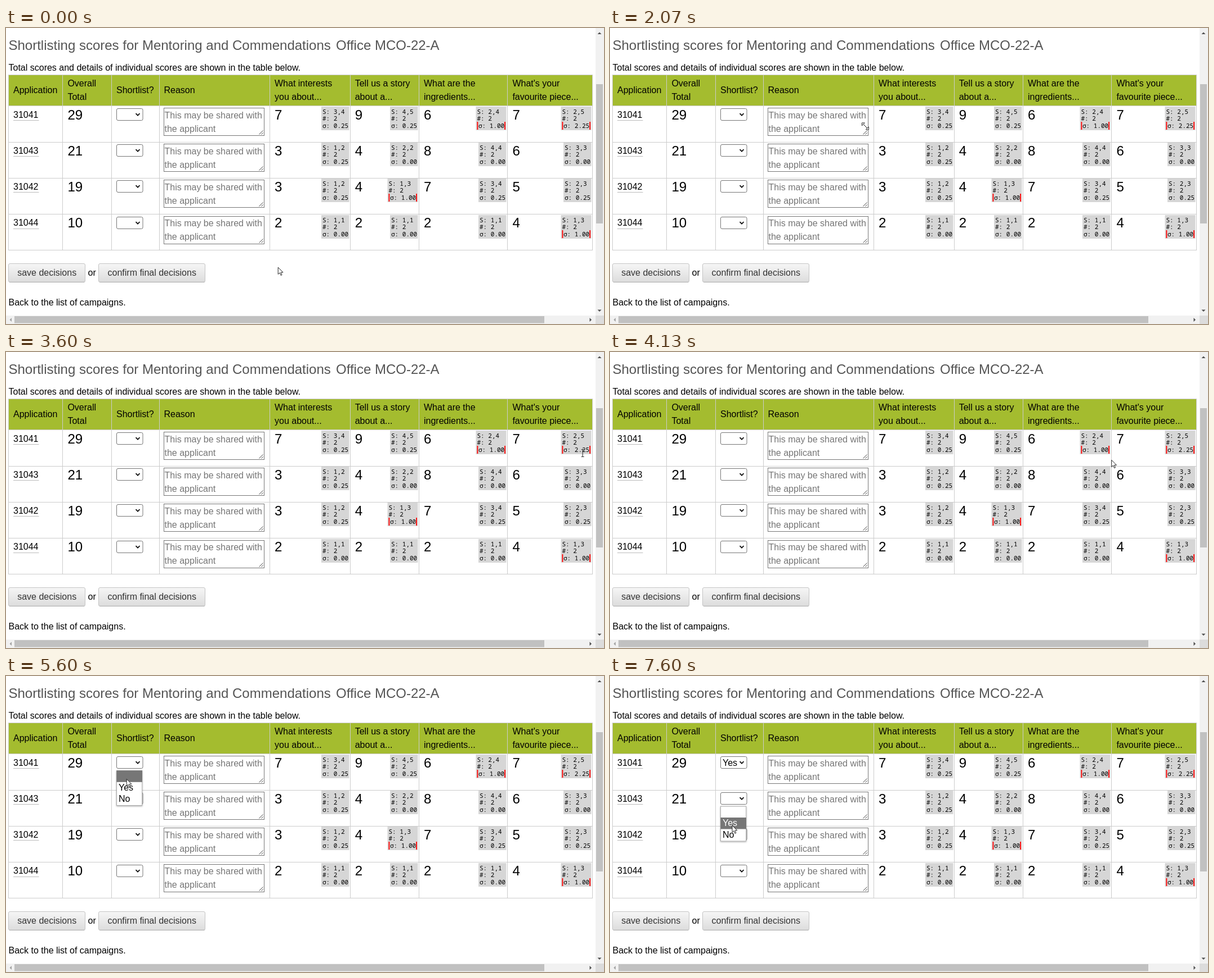
An HTML page that plays this animation: 1062x527 px, repeating every 8 s.

```html
<!DOCTYPE html>
<html lang="en">
<head>
<meta charset="utf-8">
<title>Shortlisting scores</title>
<style>
html, body { margin: 0; width: 100%; height: 100%; overflow: hidden; background: #fff; }
svg { display: block; width: 1062px; height: 527px; }
text { font: 16px "Liberation Sans", Arial, sans-serif; fill: #000; white-space: pre; }
.big { font-size: 24px; }
.title { font-size: 24px; fill: #555; }
.hint { fill: #757575; }
.mono { font: 11px "Noto Sans Mono", "DejaVu Sans Mono", monospace; }
.btn { fill: #333; }
</style>
</head>
<body>
<svg id="stage" viewBox="0 0 1062 527" xmlns="http://www.w3.org/2000/svg">
  <defs>
    <linearGradient id="face" x2="0" y2="1">
      <stop offset="0" stop-color="#f6f6f6"/><stop offset="1" stop-color="#dcdcdc"/>
    </linearGradient>
    <filter id="shade" x="-20%" y="-20%" width="140%" height="140%">
      <feDropShadow dx="0" dy="1" stdDeviation="1.6" flood-opacity=".35"/>
    </filter>
  </defs>
</svg>
<script>
const NS = 'http://www.w3.org/2000/svg';
const stage = document.getElementById('stage');

function add(tag, attrs, parent = stage) {
  const el = document.createElementNS(NS, tag);
  for (const k in attrs) el.setAttribute(k, attrs[k]);
  parent.appendChild(el);
  return el;
}
function text(x, y, str, cls = '', parent = stage) {
  const el = add('text', { x, y, class: cls }, parent);
  el.textContent = str;
  return el;
}
function box(x, y, width, height, fill, more = {}, parent = stage) {
  return add('rect', { x, y, width, height, fill, ...more }, parent);
}
function path(d, stroke, more = {}, parent = stage) {
  return add('path', { d, stroke, fill: 'none', ...more }, parent);
}
const show = (el, on) => el.setAttribute('visibility', on ? 'visible' : 'hidden');

// Page layout
const cols = [4.5, 100.9, 187.5, 272, 468.5, 611.2, 733.5, 890.9, 1041.5];
const lines = [138.5, 203.5, 267.5, 331.5, 395.5];
const pitch = 64.17;
const rowY = [0, 1, 2, 3].map(r => Math.round(r * pitch));
const badgeEnd = cols.slice(5).map(x => Math.floor(x) - 2);
const heads = [['Application'], ['Overall', 'Total'], ['Shortlist?'], ['Reason'],
  ['What interests', 'you about...'], ['Tell us a story', 'about a...'],
  ['What are the', 'ingredients...'], ["What's your", 'favourite piece...']];
// Each score pair gives the cell total and the spread
const rows = [
  ['31041', '3,4', '4,5', '2,4', '2,5'],
  ['31043', '1,2', '2,2', '4,4', '3,3'],
  ['31042', '1,2', '1,3', '3,4', '2,3'],
  ['31044', '1,1', '1,1', '1,1', '1,3']
];

text(4.5, 39, 'Shortlisting scores for Mentoring and Commendations', 'title');
text(586, 39, 'Office MCO-22-A', 'title');
text(4.5, 76, 'Total scores and details of individual scores are shown in the table below.');

box(4, 83, 1038, 55, '#a4bc2f');
heads.forEach((h, i) => {
  const x = cols[i] + 8.5;
  if (h.length === 1) text(x, 116, h[0]);
  else h.forEach((s, k) => text(x, 104 + 24 * k, s));
});
path(cols.map(x => `M${Math.floor(x) + .5} 83V396`).join('') + 'M4 83.5H1042' +
  lines.map(y => `M4 ${y}H1042`).join(''), '#ccc');

function badge(right, y, pair, spread) {
  const odd = spread >= 1;
  const w = odd ? 54 : 49.5, x = right - w + .5;
  box(x, y + 140, w, 42, '#d6d6d6');
  text(x + 2, y + 152.5, 'S: ' + pair, 'mono');
  text(x + 2, y + 165, '#: 2', 'mono');
  text(x + (odd ? 4.5 : 2), y + 178, 'σ: ' + spread.toFixed(2), 'mono');
  if (odd) for (const bx of [x + 2, x + w - 3.3])
    box(bx, y + 167, 1.8, 14, '#f00');
}

const selects = rows.map((row, r) => {
  const y = rowY[r], ty = r * pitch;
  let total = 0;
  text(13, ty + 159.7, row[0]);
  path(`M13 ${y + 164.5}H58.5`, '#bbb');
  row.slice(1).forEach((pair, i) => {
    const [a, b] = pair.split(',').map(Number);
    total += a + b;
    text(cols[i + 4] + 8.5, ty + 162.8, a + b, 'big');
    badge(badgeEnd[i], y, pair, (a - b) ** 2 / 4);
  });
  text(cols[1] + 8.5, ty + 162.8, total, 'big');

  box(280.5, y + 142.5, 178, 49, '#fff', { stroke: '#767676' });
  text(281.5, ty + 160.5, 'This may be shared with', 'hint');
  text(281.5, ty + 184.5, 'the applicant', 'hint');
  path(`M449.5 ${y + 189.5}l7 -7M453.5 ${y + 189.5}l3 -3`, '#444');

  const frame = box(196.5, y + 143.5, 46.5, 21, '#fff', { stroke: '#767676', rx: 2.5 });
  path(`M230.5 ${y + 152.2}l3.5 3.5l3.5 -3.5`, '#111', { 'stroke-width': 1.8 });
  return { frame, yes: text(200, y + 159.7, 'Yes'), y };
});

function button(x, w, label) {
  box(Math.floor(x) + .5, 419.5, w, 33, 'url(#face)', { stroke: '#c4c4c4', rx: 2.5 });
  path(`M${x + 2} 452.5h${w - 3}`, '#aaa');
  text(x + 16, 441, label, 'btn');
}
button(4.2, 136, 'save decisions');
text(145.5, 441, 'or');
button(164.5, 189, 'confirm final decisions');
text(4.5, 494, 'Back to the list of campaigns.');

// Scroll bars
box(1047, 0, 15, 512, '#f1f1f1');
box(0, 512, 1047, 15, '#f1f1f1');
box(1047, 512, 15, 15, '#dcdcdc');
box(1048, 100, 12, 248, '#c1c1c1');
box(15, 513, 941, 12.5, '#c1c1c1');
add('path', { d: 'M1050.5 501.5h7l-3.5 3.5z M1036.5 516v7l3.5 -3.5z', fill: '#505050' });
add('path', { d: 'M1050.5 11h7l-3.5 -3.5z', fill: '#505050' });
add('path', { d: 'M10 516v7l-3.5 -3.5z', fill: '#a3a3a3' });

// Drop-down list
const popup = add('g', {});
box(196.5, 168.5, 45.2, 62, '#fff', { stroke: '#aaa', filter: 'url(#shade)' }, popup);
const mark = box(196.3, 168.3, 45.7, 20.5, '#767676', {}, popup);
const optYes = text(200, 203.5, 'Yes', '', popup);
text(200, 224, 'No', '', popup);

// Pointers
const arrow = add('path', {
  d: 'M0 0V12.3L2.9 9.7L4.9 14.3L6.8 13.5L4.9 9H8.8Z',
  fill: '#fff', stroke: '#111', 'stroke-width': .9, 'stroke-linejoin': 'round'
});
const beam = path('M0 -6V6M-2.5 -6.5H2.5M-2.5 6.5H2.5', '#333', { 'stroke-width': 1.1 });
const grip = add('g', {});
path('M-4.5 -4.5L4.5 4.5', '#fff', { 'stroke-width': 3 }, grip);
path('M-4.5 -4.5L4.5 4.5', '#111', { 'stroke-width': 1.2, 'stroke-dasharray': '2 1' }, grip);
add('path', { d: 'M-6 -6h5l-5 5zM6 6h-5l5 -5z', fill: '#fff', stroke: '#111', 'stroke-width': .9 }, grip);

// start, end, then 2 points (eased line) or 4 points (cubic curve)
const moves = [
  [0, 867, [483, 427], [600, -65], [0, -65], [203, 145]],
  [867, 1000, [203, 145], [212, 148]],
  [1533, 2400, [212, 148], [230, 150], [470, 181], [741, 199]],
  [2400, 2667, [741, 199], [964, 187]],
  [2867, 3267, [964, 187], [1024, 180]],
  [3600, 4400, [1024, 180], [1085, 180], [850, 195], [790, 199]],
  [4400, 4933, [790, 199], [620, 175], [290, 85], [214, 137]],
  [4933, 5067, [214, 137], [215, 149]],
  [5267, 5733, [215, 149], [214, 192]],
  [6400, 6800, [214, 192], [223, 214]],
  [7400, 7600, [223, 214], [217, 266]]
];

function pointer(t) {
  let m = moves[0];
  for (const n of moves) if (t >= n[0]) m = n;
  const p = m.slice(2);
  const u = Math.min(1, (t - m[0]) / (m[1] - m[0])), v = 1 - u;
  return [0, 1].map(i => {
    if (p.length === 4)
      return v ** 3 * p[0][i] + 3 * v * v * u * p[1][i] + 3 * v * u * u * p[2][i] + u ** 3 * p[3][i];
    return p[0][i] + (p[1][i] - p[0][i]) * u * u * (3 - 2 * u);
  });
}

const within = (x, y, l, t, r, b) => x >= l && x <= r && y >= t && y <= b;

function shape(x, y) {
  if (within(x, y, 5, 18, 770, 44)) return beam;
  if (within(x, y, 5, 62, 523, 79)) return beam;
  for (const dy of rowY) {
    if (within(x, y, 444, dy + 172, 460, dy + 192)) return grip;
    if (within(x, y, 280, dy + 142, 459, dy + 192)) return beam;
    if (badgeEnd.some(e => within(x, y, e - 52, dy + 140, e, dy + 182))) return beam;
  }
  return arrow;
}

function draw(ms) {
  const step = 1000 / 15;
  const t = Math.floor((ms + 3.5) / step) * step + .5;
  const [x, y] = pointer(t);
  const first = t >= 5130 && t < 6130, second = t >= 7130;
  const open = first || second;

  selects.forEach((s, i) => {
    const focus = i === 0 && t >= 6130 && t < 7130;
    const hover = !open && within(x, y, 196, s.y + 143, 243, s.y + 165);
    s.frame.setAttribute('stroke', focus ? '#101010' : hover ? '#4f4f4f' : '#767676');
    s.frame.setAttribute('stroke-width', focus ? 2 : 1);
    show(s.yes, i === 0 && t >= 6130);
  });

  popup.setAttribute('display', open ? 'inline' : 'none');
  popup.setAttribute('transform', `translate(0 ${second ? 63.5 : 0})`);
  const onYes = y >= (second ? 252 : 188.5);
  mark.setAttribute('y', onYes ? 188.5 : 168.3);
  optYes.style.fill = onYes ? '#fff' : '#000';

  const now = open ? arrow : shape(x, y);
  for (const c of [arrow, beam, grip]) show(c, c === now);
  now.setAttribute('transform', `translate(${x.toFixed(1)} ${y.toFixed(1)})`);
}

const begin = performance.now();
function tick() {
  draw((performance.now() - begin) % 8000);
  requestAnimationFrame(tick);
}
tick();
</script>
</body>
</html>
```
